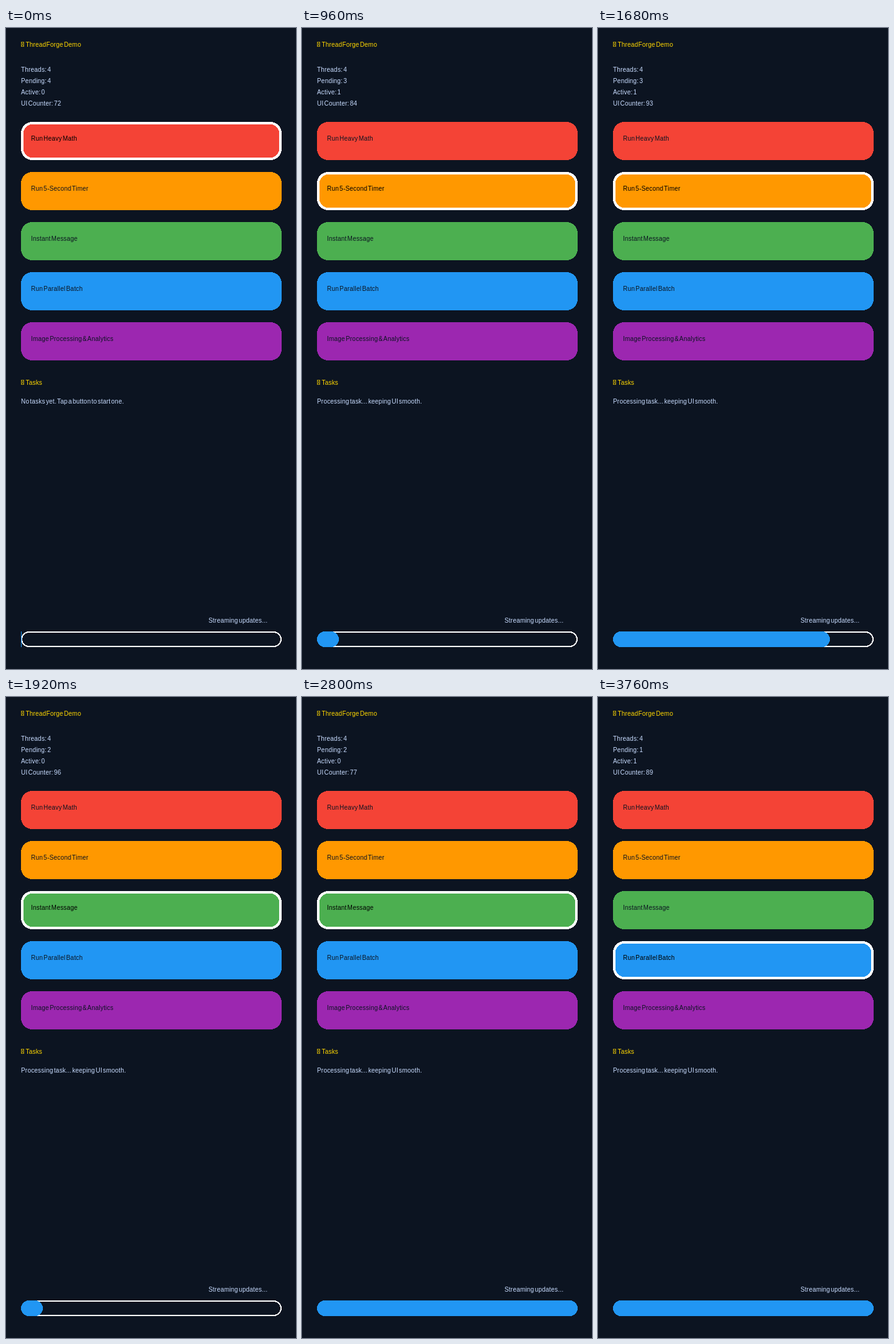
These frames come from a looping animation (464x1024 px, 3840 ms). An HTML page:

```html
<!DOCTYPE html>
<html lang="en">
<head>
<meta charset="utf-8">
<title>Thread pool demo</title>
<style>
  html, body { margin: 0; width: 100%; height: 100%; overflow: hidden; background: #0c1421; }
  svg { display: block; width: 464px; height: 1024px; }
  rect { shape-rendering: crispEdges; }
  text {
    font: 10px "Liberation Sans", Arial, sans-serif;
    letter-spacing: .2px;
    word-spacing: -1.8px;
    fill: #c8dcff;
    white-space: pre;
  }
  .gold { fill: #ffd700; }
  .label { fill: #0c1421; }
  .label.on { fill: #000; }
  .tofu { fill: none; stroke: #ffd700; stroke-opacity: .75; }
  .ring { fill: none; stroke: #fff; }
</style>
</head>
<body>
<svg viewBox="0 0 464 1024">
  <defs>
    <path id="tofu" class="tofu" d="M.5 .5h4v7h-4zl4 7m0-7l-4 7" stroke-width=".8"/>
  </defs>

  <use href="#tofu" x="24" y="22"/>
  <text class="gold" x="31.5" y="30">ThreadForge Demo</text>

  <text x="24" y="70">Threads: 4</text>
  <text x="24" y="88" id="pending"></text>
  <text x="24" y="106" id="active"></text>
  <text x="24" y="124" id="counter"></text>

  <g id="buttons"></g>
  <rect id="focus" class="ring" x="26" y="152" width="413" height="57" rx="16" stroke-width="4"/>
  <g id="labels"></g>

  <use href="#tofu" x="24" y="562"/>
  <text class="gold" x="31.5" y="570">Tasks</text>
  <text x="24" y="600" id="status"></text>

  <text x="324" y="950">Streaming updates...</text>
  <rect class="ring" x="25" y="965" width="415" height="23" rx="11.5" stroke-width="2"/>
  <rect id="bar" x="24" y="964" height="25" fill="#2196f3"/>
</svg>
<script>
  const STEP = 80, STEPS = 48, PHASE = 12, TRACK = 416;
  const BUTTONS = [
    ["Run Heavy Math", "#f44336"],
    ["Run 5-Second Timer", "#ff9800"],
    ["Instant Message", "#4caf50"],
    ["Run Parallel Batch", "#2196f3"],
    ["Image Processing & Analytics", "#9c27b0"]
  ];
  const $ = id => document.getElementById(id);

  function add(parent, tag, attrs, text = "") {
    const el = document.createElementNS("http://www.w3.org/2000/svg", tag);
    for (const key in attrs) el.setAttribute(key, attrs[key]);
    el.textContent = text;
    return parent.appendChild(el);
  }

  const labels = BUTTONS.map(([name, fill], i) => {
    const y = 150 + 80 * i;
    add($("buttons"), "rect", { x: 24, y, width: 417, height: 61, rx: 18, fill });
    return add($("labels"), "text", { x: 40, y: y + 30, class: "label" }, name);
  });

  function setBar(part) {
    const width = Math.floor(part * TRACK + 1e-6) + 1;
    const bar = $("bar");
    bar.setAttribute("width", width);
    bar.setAttribute("rx", width > 1 ? Math.min(12.5, width / 2) : 0);
    bar.setAttribute("ry", width > 1 ? 12.5 : 0);
  }

  function draw(step) {
    const phase = Math.floor(step / PHASE);
    $("pending").textContent = "Pending: " + (4 - phase);
    $("active").textContent = "Active: " + phase % 2;
    $("counter").textContent = "UI Counter: " + (70 + (step + 2) % 30);
    $("status").textContent = phase
      ? "Processing task... keeping UI smooth."
      : "No tasks yet. Tap a button to start one.";
    $("focus").setAttribute("y", 152 + 80 * phase);
    labels.forEach((el, i) => el.classList.toggle("on", i === phase));
    // idle: creeps along the whole loop; busy: fills once per task
    setBar(phase ? (step % PHASE + 1) / PHASE : step / (STEPS - 1));
  }

  let last = -1;
  function tick(now) {
    const step = Math.floor(now / STEP) % STEPS;
    if (step !== last) draw(last = step);
    requestAnimationFrame(tick);
  }
  draw(0);
  requestAnimationFrame(tick);
</script>
</body>
</html>
```
